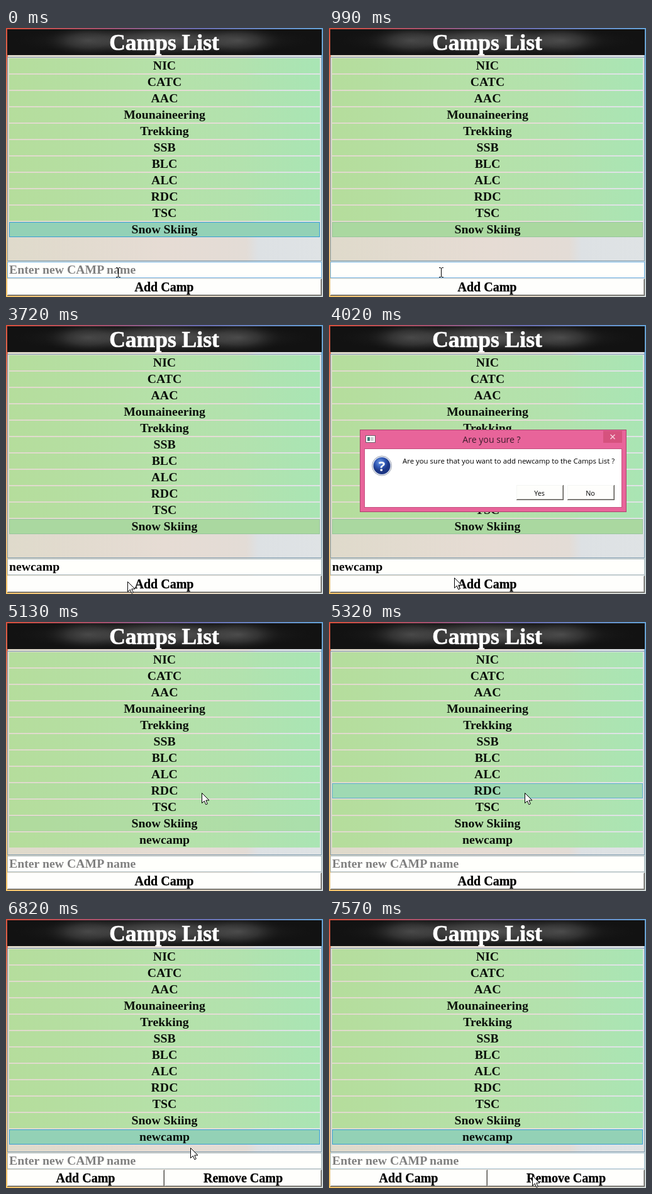
An HTML page for the animation above (8 s loop, 504 by 427 pixels).

```html
<!DOCTYPE html>
<html lang="en">
<head>
<meta charset="utf-8">
<title>Camps List</title>
<style>
  html, body { margin: 0; width: 100%; height: 100%; overflow: hidden; background: #e6d8c4; }
  svg { display: block; width: 504px; height: 427px; }
  text { font-family: "Liberation Serif", "Times New Roman", serif; font-weight: bold; font-size: 19.8px; white-space: pre; }
  .mid { text-anchor: middle; }
  .btn { font-size: 20px; stroke: #000; stroke-width: .3; }
  .ui { font-family: "Open Sans", sans-serif; font-weight: normal; font-size: 11.4px; }
</style>
</head>
<body>
<svg id="stage" viewBox="0 0 504 427" xmlns="http://www.w3.org/2000/svg">
  <defs>
    <linearGradient id="top"><stop stop-color="#d8503c"/><stop offset=".3" stop-color="#a8506c"/><stop offset=".6" stop-color="#6a6cb0"/><stop offset="1" stop-color="#64a0d4"/></linearGradient>
    <linearGradient id="left" x2="0" y2="1"><stop stop-color="#d8503c"/><stop offset=".3" stop-color="#e0906c"/><stop offset=".75" stop-color="#ecc088"/><stop offset="1" stop-color="#f6c468"/></linearGradient>
    <linearGradient id="right" x2="0" y2="1"><stop stop-color="#64a0d4"/><stop offset=".4" stop-color="#8cb8d0"/><stop offset="1" stop-color="#d0d8d8"/></linearGradient>
    <linearGradient id="bottom"><stop stop-color="#f6c468"/><stop offset=".4" stop-color="#f0d8b8"/><stop offset="1" stop-color="#d0d8d8"/></linearGradient>
    <linearGradient id="panel" gradientUnits="userSpaceOnUse" x1="3" x2="501" y1="0" y2="0"><stop stop-color="#dfdacb"/><stop offset=".5" stop-color="#e6dcd4"/><stop offset=".76" stop-color="#e3dcd6"/><stop offset=".8" stop-color="#dde1e4"/><stop offset="1" stop-color="#dfe3e5"/></linearGradient>
    <linearGradient id="green" gradientUnits="userSpaceOnUse" x1="5" x2="499" y1="200" y2="170"><stop stop-color="#b5dd9c"/><stop offset=".5" stop-color="#b5e1a9"/><stop offset=".75" stop-color="#b2e2ae"/><stop offset="1" stop-color="#a9e5b4"/></linearGradient>
    <radialGradient id="glow"><stop stop-color="#808080" stop-opacity=".9"/><stop offset=".45" stop-color="#606060" stop-opacity=".7"/><stop offset="1" stop-color="#222" stop-opacity="0"/></radialGradient>
    <radialGradient id="ball" cx=".4" cy=".3"><stop stop-color="#6f9be4"/><stop offset=".6" stop-color="#2f57b4"/><stop offset="1" stop-color="#1c3684"/></radialGradient>
    <clipPath id="banner"><rect x="2" y="2" width="500" height="41"/></clipPath>
  </defs>
</svg>
<script>
const LOOP = 8000;
const stage = document.getElementById('stage');

function el(tag, attrs, parent = stage, text = '') {
  const node = document.createElementNS('http://www.w3.org/2000/svg', tag);
  set(node, attrs);
  node.textContent = text;
  parent.appendChild(node);
  return node;
}
function set(node, attrs) {
  for (const key in attrs) node.setAttribute(key, attrs[key]);
}
const box = (x, y, width, height, fill, parent, more) =>
  el('rect', { x, y, width, height, fill, ...more }, parent);
const label = (text, x, y, cls, fill, parent) =>
  el('text', { x, y, class: cls, fill }, parent, text);
const frame = (x, y, w, h, fill, stroke, parent) =>
  box(x + .5, y + .5, w - 1, h - 1, fill, parent, { stroke });
const show = (node, opacity) => node.setAttribute('opacity', +opacity);
const ramp = (t, from, to) => Math.min(1, Math.max(0, (t - from) / (to - from)));

function bevel(x, y, w, h, parent) {
  const g = el('g', {}, parent);
  box(x, y, w, h, '#585450', g);
  box(x, y, w - 1, h - 1, '#f4f6f4', g);
  box(x + 1, y + 1, w - 2, h - 2, '#a8a8a4', g);
  box(x + 1, y + 1, w - 3, h - 3, '#fefefc', g);
  return g;
}

// Window edges and banner
box(0, 0, 504, 427, 'url(#panel)');
box(0, 0, 3, 427, 'url(#left)');
box(501, 0, 3, 427, 'url(#right)');
box(0, 424, 504, 3, 'url(#bottom)');
box(0, 0, 504, 3, 'url(#top)');
box(2, 2, 500, 41, '#121212');
const banner = el('g', { 'clip-path': 'url(#banner)' });
for (const [cx, rx] of [[251, 240], [130, 70], [251, 140], [370, 70]])
  el('ellipse', { cx, cy: 20, rx, ry: 25, fill: 'url(#glow)', opacity: .45 }, banner);
set(label('Camps List', 251.5, 35, 'mid', '#fff'), { style: 'font-size:35.5px', stroke: '#fff', 'stroke-width': .7 });

// List
frame(2, 46, 500, 324, 'url(#panel)', '#7f9cae');
const names = ['NIC', 'CATC', 'AAC', 'Mounaineering', 'Trekking', 'SSB', 'BLC', 'ALC', 'RDC', 'TSC', 'Snow Skiing', 'newcamp'];
const SKIING = 10, ADDED = 11;
const rows = names.map((name, i) => {
  const y = 48 + 26 * i;
  const g = el('g', {});
  const layer = (fill, stroke) => frame(5, y, 494, 24, fill, stroke, g);
  box(5, y, 494, 24, 'url(#green)', g);
  const row = {
    g,
    idle: layer('#aad8a0', '#98c69c'),
    hover: layer('#9fd9b3', '#5cb0cc'),
    picked: layer('#93d1b6', '#369ed6')
  };
  label(name, 252, y + 18, 'mid', '#0a0f0a', g);
  return row;
});

// Input
const field = frame(2, 371, 500, 26, '#fffffc', '#a8b8bc');
const hint = label('Enter new CAMP name', 5, 390, '', '#808080');
const typed = label('', 5, 390, '', '#000');
const caret = box(5, 374, 1, 20, '#000');

// Buttons
const wide = bevel(2, 398, 500, 27);
label('Add Camp', 251.5, 418, 'mid btn', '#000', wide);
const split = el('g', {});
bevel(2, 398, 250, 27, split);
bevel(252, 398, 250, 27, split);
label('Add Camp', 126.5, 418, 'mid btn', '#000', split);
label('Remove Camp', 377, 418, 'mid btn', '#000', split);

// Dialog
const dialog = el('g', {});
frame(49, 166, 424, 131, '#e8649a', '#a8486e', dialog);
frame(56, 196, 410, 94, '#fff', '#c4507e', dialog);
frame(58, 175, 16, 12, '#fff', '#70606c', dialog);
box(61, 178, 4, 6, '#3c7c78', dialog);
box(66, 178, 5, 6, '#c8d0d0', dialog);
set(label('Are you sure ?', 258.5, 187, 'ui mid', '#3c1c2c', dialog), { style: 'font-size:14.1px' });
box(436, 168, 30, 19, '#d6527e', dialog);
el('path', { d: 'M447.5 174l7 7m0-7l-7 7', stroke: '#f8d4e0', 'stroke-width': 1.4 }, dialog);
el('circle', { cx: 84, cy: 223.5, r: 15.5, fill: '#e4e8f0', stroke: '#9ca4b4' }, dialog);
el('circle', { cx: 84, cy: 223.5, r: 13.5, fill: 'url(#ball)' }, dialog);
set(label('?', 84, 231.5, 'ui mid', '#fff', dialog), { style: 'font-size:22px;font-weight:bold' });
label('Are you sure that you want to add newcamp to the Camps List ?', 117, 220, 'ui', '#000', dialog);
bevel(298, 254, 75, 24, dialog);
bevel(379, 254, 75, 24, dialog);
for (const [text, x] of [['Yes', 334.5], ['No', 415.5]])
  set(label(text, x, 271, 'ui mid', '#000', dialog), { style: 'font-size:10.8px' });

// Pointers
const arrow = el('path', { d: 'M.5 .5V16.5L4.3 13 6.8 18.8 9.3 17.7 6.8 12H12Z', fill: '#fff', stroke: '#000' });
const beam = el('path', { d: 'M-3 -7.5H-1L.5 -6.5 2 -7.5H4M-3 7.5H-1L.5 6.5 2 7.5H4M.5 -6.5V6.5', fill: 'none', stroke: '#000' });

// time, x, y
const path = [
  [0, 178, 388], [3140, 178, 388], [3660, 193, 407], [3900, 193, 407], [4020, 199, 401],
  [4710, 311, 271], [5450, 311, 271], [5970, 293, 346], [6540, 293, 346],
  [6820, 293, 363], [7340, 323, 407], [LOOP, 323, 407]
];
function pointerAt(t) {
  const i = path.findIndex(p => p[0] > t);
  const [t0, x0, y0] = path[i - 1], [t1, x1, y1] = path[i];
  const k = ramp(t, t0, t1);
  return [Math.round(x0 + (x1 - x0) * k), Math.round(y0 + (y1 - y0) * k)];
}

const keyTimes = [1630, 1710, 1780, 2080, 2180, 2290, 2390];
const caretSpans = [[310, 990], [1550, 3010], [3560, 3660]];
const borders = [[0, '#6cb0e2'], [3660, '#a8b8bc'], [6920, '#7eb4dc'], [7570, '#a6c2d0']];
const pick = (t, steps) => steps.filter(s => s[0] <= t).pop()[1];

function render(t) {
  const [x, y] = pointerAt(t);
  const modal = t >= 3900 && t < 5020;
  const overField = y >= 371 && y < 397 && !modal;
  set(arrow, { transform: `translate(${x} ${y})` });
  set(beam, { transform: `translate(${x} ${y})` });
  show(arrow, !overField);
  show(beam, overField);

  rows.forEach((row, i) => {
    const top = 48 + 26 * i;
    const hovered = !modal && y >= top - 1 && y < top + 25;
    show(row.hover, hovered ? ramp(t, 5120, 5320) : 0);
    show(row.idle, i === SKIING ? (t >= 310) * (1 - ramp(t, 5020, 5200)) : 0);
    show(row.picked, i === SKIING ? 1 - ramp(t, 310, 610) : i === ADDED ? ramp(t, 6200, 6340) : 0);
  });
  show(rows[ADDED].g, t >= 5060);

  const editing = t >= 310 && t < 5060;
  const count = editing ? keyTimes.filter(k => k <= t).length : 0;
  typed.textContent = 'newcamp'.slice(0, count);
  show(hint, !editing);
  set(caret, { x: count ? Math.round(5 + typed.getComputedTextLength()) : 5 });
  show(caret, caretSpans.some(([from, to]) => t >= from && t < to));
  set(field, { stroke: pick(t, borders) });

  show(wide, t < 6340);
  show(split, t >= 6340);

  const opacity = ramp(t, 3880, 4010) * (1 - ramp(t, 4990, 5120));
  const scale = .95 + .05 * opacity;
  show(dialog, opacity);
  set(dialog, { transform: `translate(261 231.5) scale(${scale}) translate(-261 -231.5)` });
}

const start = performance.now();
function tick() {
  render((performance.now() - start) % LOOP);
  requestAnimationFrame(tick);
}
tick();
</script>
</body>
</html>
```
